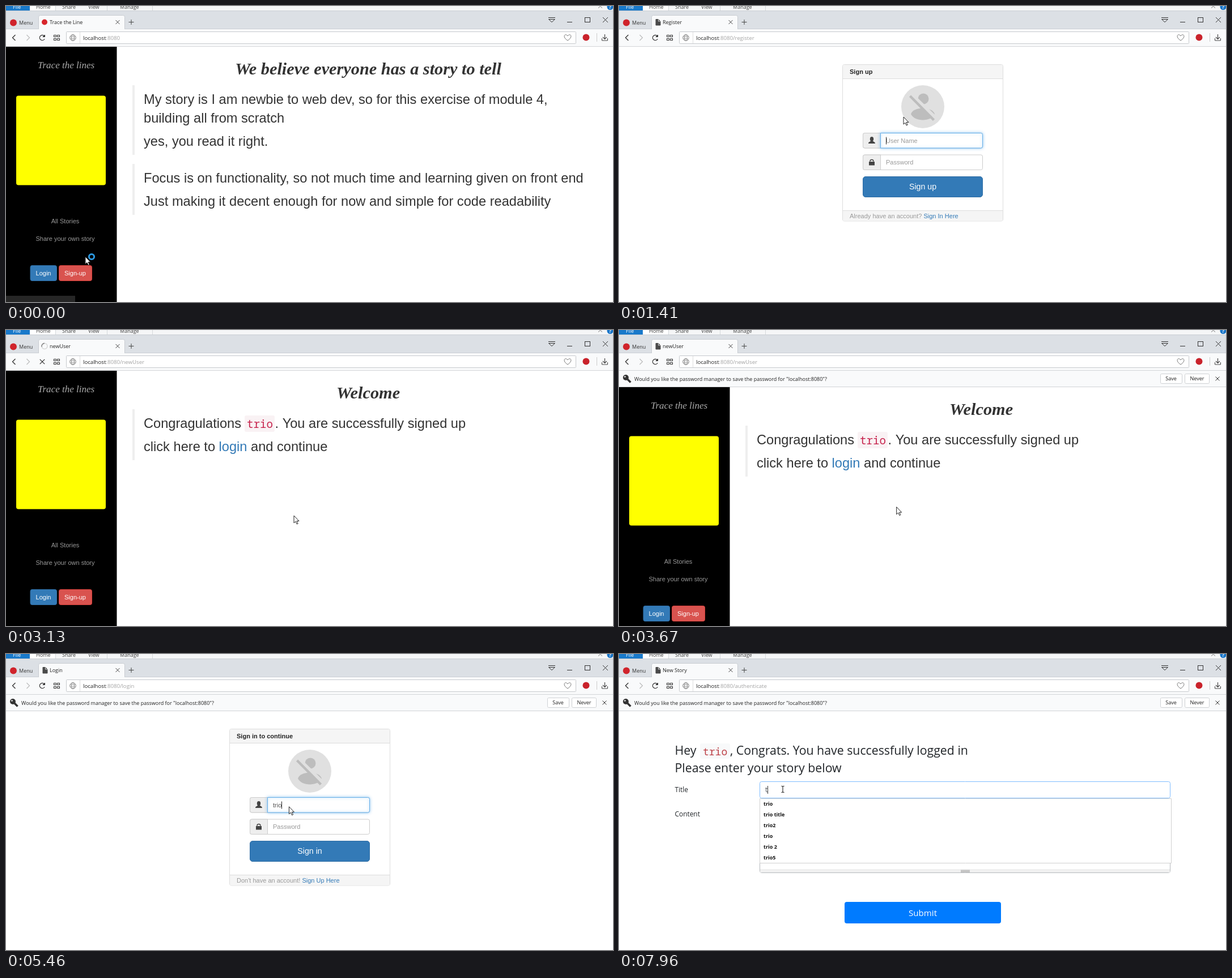
Write an HTML page with a canvas that moves like this. It is 1071 px wide and 523 px high and loops after 8000 ms.

```html
<!DOCTYPE html>
<html lang="en">
<head>
<meta charset="utf-8">
<title>Sign up, sign in, write a story</title>
<style>
html, body { margin: 0; width: 100%; height: 100%; overflow: hidden; background: #fff; }
canvas { display: block; width: 1071px; height: 523px; }
</style>
</head>
<body>
<canvas id="stage"></canvas>
<script>
const W = 1071, H = 523, LOOP = 8000, BAR = 29;
const canvas = document.getElementById('stage');
const c = canvas.getContext('2d');
const dpr = window.devicePixelRatio || 1;
canvas.width = W * dpr;
canvas.height = H * dpr;

const USER = 'trio';
const UI = '"Open Sans", "Noto Sans", sans-serif';
const SANS = '"Liberation Sans", Arial, sans-serif';
const MONO = '"Noto Sans Mono", "DejaVu Sans Mono", monospace';
const SCRIPT = '"Liberation Serif", serif';
const SMALL = '11.03px ' + SANS;
const BODY = '23.64px ' + SANS;

// Screen updates come in bursts: start, end, number of steps
const BURSTS = [
  [80, 870, 11], [950, 1410, 7], [1570, 1880, 5], [2030, 2500, 7],
  [2760, 3370, 9], [3590, 3980, 6], [4210, 4530, 5], [4760, 5540, 11],
  [5710, 6250, 8], [6420, 6890, 7], [7350, 7810, 7], [7960, 7960, 1]
];

// Pointer path: time, x, y, shape
const PATH = [
  [0, 140, 443, 'busy'], [80, 140, 446, 'arrow'], [235, 125, 470, 'hand'],
  [390, 125, 470, 'hand'], [633, 487, 310, 'hand'], [945, 487, 310, 'hand'],
  [1100, 497, 238, 'beam'], [1255, 497, 238, 'beam'], [1410, 502, 196, 'arrow'],
  [1725, 502, 196, 'arrow'], [1880, 497, 285, 'beam'], [2420, 497, 285, 'beam'],
  [2500, 508, 328, 'arrow'], [3590, 508, 328, 'arrow'], [3900, 392, 231, 'hand'],
  [4210, 392, 231, 'hand'], [4290, 399, 245, 'arrow'], [4530, 487, 339, 'hand'],
  [4760, 487, 339, 'hand'], [4990, 497, 266, 'beam'], [5070, 497, 266, 'beam'],
  [5225, 502, 222, 'arrow'], [5380, 502, 222, 'arrow'], [5540, 497, 314, 'beam'],
  [6020, 497, 314, 'beam'], [6170, 512, 349, 'arrow'], [6730, 512, 349, 'arrow'],
  [6800, 512, 349, 'beam'], [7350, 512, 349, 'beam'], [7650, 289, 239, 'beam']
];

function snap(t) {
  let at = 0;
  for (const [from, to, steps] of BURSTS) {
    if (t < from) break;
    const gap = (to - from) / Math.max(1, steps - 1);
    const n = gap ? Math.min(steps - 1, Math.floor((t - from + 10) / gap)) : 0;
    at = from + n * gap;
  }
  return at;
}

function pointerAt(t) {
  let i = 0;
  while (i < PATH.length - 1 && PATH[i + 1][0] <= t) i++;
  const a = PATH[i], b = PATH[i + 1] || a;
  let k = b === a ? 0 : (t - a[0]) / (b[0] - a[0]);
  k = k * k * (3 - 2 * k);
  return { x: a[1] + (b[1] - a[1]) * k, y: a[2] + (b[2] - a[2]) * k, shape: k > 0.6 ? b[3] : a[3] };
}

const typed = (t, from, gap) => Math.max(0, Math.min(4, 1 + Math.floor((t - from + 6) / gap)));

function text(str, x, y, font, color, align = 'left') {
  c.font = font;
  c.fillStyle = color;
  c.textAlign = align;
  c.fillText(str, x, y);
}

function rect(x, y, w, h, color) {
  c.fillStyle = color;
  c.fillRect(x, y, w, h);
}

function box(x, y, w, h, r, fill, stroke) {
  c.beginPath();
  c.roundRect(x, y, w, h, r);
  if (fill) { c.fillStyle = fill; c.fill(); }
  if (stroke) { c.strokeStyle = stroke; c.lineWidth = 1; c.stroke(); }
}

function line(points, color, width = 1, fill) {
  c.beginPath();
  for (let i = 0; i < points.length; i += 2) c.lineTo(points[i], points[i + 1]);
  if (fill) { c.closePath(); c.fillStyle = fill; c.fill(); }
  c.strokeStyle = color;
  c.lineWidth = width;
  c.stroke();
}

function dot(x, y, r, color) {
  c.beginPath();
  c.arc(x, y, r, 0, 7);
  c.fillStyle = color;
  c.fill();
}

function arc(x, y, r, a, b, color, width = 1) {
  c.beginPath();
  c.arc(x, y, r, a, b);
  c.strokeStyle = color;
  c.lineWidth = width;
  c.stroke();
}

function cross(x, y, r, color, width = 1) {
  line([x - r, y - r, x + r, y + r], color, width);
  line([x - r, y + r, x + r, y - r], color, width);
}

function ribbon() {
  rect(0, 0, W, 9, '#f5f6f7');
  rect(0, 0, 42, 8, '#1979ca');
  rect(42, 0, 46, 8, '#fff');
  text('File', 12, 5, '9px ' + UI, '#fff');
  [['Home', 53], ['Share', 99], ['View', 145], ['Manage', 201]].forEach(([s, x]) => text(s, x, 5, '9px ' + UI, '#444'));
  for (const x of [87, 178, 258]) rect(x, 0, 1, 8, '#d5d8db');
  line([1045, 3.5, 1048.5, 0.5, 1052, 3.5], '#777');
  dot(1066, 1.5, 5.5, '#1976c9');
  text('?', 1066, 5, 'bold 8px ' + UI, '#fff', 'center');
  rect(0, 8, W, 1, '#c9cdd2');
}

function favicon(page, loading, t) {
  if (loading) {
    arc(68, 28.5, 5, 0, 7, '#d8d8d8', 1.6);
    const a = 2.6 + t / 160;
    arc(68, 28.5, 5, a, a + 1.8, '#8c8c8c', 1.6);
  } else if (page === 'home') {
    dot(68, 28.5, 5, '#d8262c');
  } else {
    line([65, 23.5, 69.5, 23.5, 73, 27, 73, 34, 65, 34], '#4a4a4a', 1, '#4a4a4a');
    line([69.5, 23.5, 69.5, 27, 73, 27], '#f9fafb', 0.8);
  }
}

const TABS = {
  home: ['Trace the Line', ''], register: ['Register', '/register'], newUser: ['newUser', '/newUser'],
  login: ['Login', '/login'], story: ['New Story', '/authenticate']
};

function browser(page, loading, t) {
  ribbon();
  rect(0, 9, W, 32, '#dce0e5');
  rect(0, 40, W, 1, '#ccd0d5');
  box(57.5, 16.5, 152, 26, [3, 3, 0, 0], '#f9fafb', '#c8ccd1');
  rect(0, 41, W, 31, '#f9fafb');
  rect(0, 71, W, 1, '#d3d5d8');
  dot(13, 29.5, 6, '#d0232b');
  text('Menu', 23, 33, '9px ' + UI, '#333');
  favicon(page, loading, t);
  text(TABS[page][0], 77, 32, '9px ' + UI, '#222');
  cross(197, 28.5, 3.5, '#444');
  line([216.5, 28.5, 225.5, 28.5], '#444');
  line([221, 24, 221, 33], '#444');

  line([957, 20.5, 969, 20.5], '#333');
  line([957.5, 23.5, 963, 28.5, 968.5, 23.5, 957.5, 23.5], '#333');
  line([990, 28.5, 999, 28.5], '#333');
  c.strokeRect(1021.5, 20.5, 9, 8);
  cross(1057.5, 24.5, 4.5, '#333');

  line([16.5, 51, 11.5, 56, 16.5, 61], '#333', 1.3);
  line([36.5, 51, 41.5, 56, 36.5, 61], '#bbb', 1.2);
  if (loading) cross(64, 56, 4.2, '#333', 1.2);
  else {
    arc(64, 56, 4.6, 0.5, 5.6, '#333', 1.3);
    line([68.5, 51, 68.5, 54.5, 65, 54.5], '#333', 1, '#333');
  }
  c.strokeStyle = '#333';
  c.lineWidth = 1;
  for (const x of [84.5, 90.5]) for (const y of [51.5, 57.5]) c.strokeRect(x, y, 4, 3);

  box(106.5, 45.5, 899, 21, 1, '#fff', '#c6c9cd');
  rect(130, 46, 1, 20, '#dcdcdc');
  arc(118, 56, 5.3, 0, 7, '#888');
  c.beginPath();
  c.ellipse(118, 56, 2.4, 5.3, 0, 0, 7);
  c.stroke();
  line([113, 54.2, 123, 54.2], '#888', 0.8);
  line([113, 57.8, 123, 57.8], '#888', 0.8);
  const font = '9.64px ' + UI;
  text('localhost', 136, 60, font, '#222');
  const x = 136 + c.measureText('localhost').width;
  text(':8080' + TABS[page][1], x, 60, font, '#a3a3a3');
  c.beginPath();
  c.moveTo(991, 61);
  c.bezierCurveTo(980, 54, 987, 47, 991, 53);
  c.bezierCurveTo(995, 47, 1002, 54, 991, 61);
  c.strokeStyle = '#777';
  c.lineWidth = 1;
  c.stroke();
  dot(1023.5, 55.5, 6, '#c9222b');
  rect(1042, 48, 1, 15, '#ccc');
  line([1056.5, 50, 1056.5, 58], '#444', 1.2);
  line([1053, 55, 1056.5, 58.5, 1060, 55], '#444', 1.2);
  line([1051.5, 57, 1051.5, 61, 1061.5, 61, 1061.5, 57], '#444');
}

function passwordBar() {
  rect(0, 72, W, 28, '#f9fafb');
  rect(0, 100, W, 1, '#d0d2d5');
  dot(12, 84, 5, '#333');
  line([14, 86, 20.5, 92.5], '#333', 3.6);
  dot(10.5, 82.5, 1.3, '#f9fafb');
  text('Would you like the password manager to save the password for "localhost:8080"?', 27, 90, '9px ' + UI, '#222');
  box(955.5, 77.5, 38, 17, 2, '#fff', '#cfd1d4');
  box(998.5, 77.5, 43, 17, 2, '#fff', '#cfd1d4');
  text('Save', 974, 89, '9.1px ' + UI, '#222', 'center');
  text('Never', 1020, 89, '9.1px ' + UI, '#222', 'center');
  cross(1056, 86, 3.5, '#333');
}

function sidebar() {
  rect(0, 72, 195.5, H, '#000');
  text('Trace the lines', 106, 110, 'italic 17px ' + SCRIPT, '#aaa', 'center');
  box(18, 158.5, 158, 158, 4, '#ff0');
  text('All Stories', 104.5, 383.5, SMALL, '#999', 'center');
  text('Share your own story', 104.5, 415, SMALL, '#999', 'center');
  box(43, 458.5, 46.5, 27, 3, '#337ab7', '#2e6da4');
  box(93.5, 458.5, 58, 27, 3, '#d9534f', '#d43f3a');
  text('Login', 66, 475.7, SMALL, '#fff', 'center');
  text('Sign-up', 122, 475.7, SMALL, '#fff', 'center');
}

function title(str) {
  text(str, 639, 121, 'italic bold 30.3px ' + SCRIPT, '#333', 'center');
}

function quote(y, h, rows) {
  rect(223, y, 4, h, '#eee');
  for (const [str, base] of rows) text(str, 243, base, BODY, '#333');
}

function home() {
  sidebar();
  title('We believe everyone has a story to tell');
  quote(140, 123, [
    ['My story is I am newbie to web dev, so for this exercise of module 4,', 173],
    ['building all from scratch', 206], ['yes, you read it right.', 247]]);
  quote(279, 90, [
    ['Focus is on functionality, so not much time and learning given on front end', 312],
    ['Just making it decent enough for now and simple for code readability', 353]]);
}

function welcome() {
  sidebar();
  title('Welcome');
  quote(140, 90, [['Congragulations', 173], ['click here to', 214]]);
  box(421, 151, 53, 29, 3, '#f9f2f4');
  text(USER, 425, 173, '19.2px ' + MONO, '#c7254e');
  text('. You are successfully signed up', 474.5, 173, BODY, '#333');
  text('login', 375.5, 214, BODY, '#337ab7');
  text('and continue', 432, 214, BODY, '#333');
}

function avatar() {
  dot(536, 178, 38, '#e0e0e0');
  dot(537, 164, 9.5, '#bdbdbd');
  c.beginPath();
  c.moveTo(515, 191);
  c.bezierCurveTo(519, 177, 553, 177, 557, 191);
  c.bezierCurveTo(550, 205, 522, 205, 515, 191);
  c.fill();
  line([516, 156, 561, 200], '#e0e0e0', 6);
  line([513.5, 159, 555.5, 201.5], '#bdbdbd', 4.5);
}

function userIcon() {
  c.beginPath();
  c.ellipse(446, 235, 3.2, 4, 0, 0, 7);
  c.fillStyle = '#444';
  c.fill();
  c.beginPath();
  c.moveTo(440, 243);
  c.bezierCurveTo(440, 239.5, 444, 240, 444.5, 237.5);
  c.lineTo(447.5, 237.5);
  c.bezierCurveTo(448, 240, 452, 239.5, 452, 243);
  c.fill();
}

function lockIcon() {
  rect(441, 275, 10, 6.5, '#444');
  arc(446, 274.5, 3, Math.PI, 0, '#444', 1.7);
}

function field(y, hint, value, focus, caret, icons) {
  const split = icons ? 461.5 : 459.5;
  box(430.5, y, 211, 26.5, 3, '#fff', '#ccc');
  box(430.5, y, split - 430.5, 26.5, [3, 0, 0, 3], '#eee', '#ccc');
  if (focus) {
    c.save();
    c.shadowColor = 'rgba(102,175,233,.7)';
    c.shadowBlur = 5 * dpr;
    box(split, y, 641.5 - split, 26.5, [0, 3, 3, 0], '#fff', '#66afe9');
    c.restore();
  }
  const x = split + 9.5, base = y + 17.2;
  let end = x;
  if (hint === 'Password' && value) {
    for (let i = 0; i < value.length; i++) dot(x + 2 + i * 4, y + 13.3, 1.4, '#444');
    end += value.length * 4 + 0.5;
  } else {
    text(value || hint, x, base, SMALL, value ? '#555' : '#999');
    if (value) end += c.measureText(value).width;
  }
  if (caret) rect(Math.round(end), y + 7, 1, 13, '#222');
}

function form(o) {
  box(394.5, 103.5, 283, 276.5, 3, '#fff', '#ddd');
  box(395, 104, 282, 24, [3, 3, 0, 0], '#f5f5f5');
  rect(395, 128, 282, 1, '#ddd');
  rect(395, 361, 282, 18.5, '#f5f5f5');
  rect(395, 361, 282, 1, '#ddd');
  text(o.head, 407, 120, 'bold ' + SMALL, '#222');
  avatar();
  field(224.5, 'User Name', o.user, o.focus === 1, o.focus === 1 || o.caret, o.icons);
  field(263, 'Password', o.pass, o.focus === 2, o.focus === 2, o.icons);
  if (o.icons) { userIcon(); lockIcon(); }
  if (o.pressed) box(429.5, 300.5, 213, 38, 5, '#7fb0f5');
  box(430.5, 301.5, 211, 36, 4.5, o.pressed ? '#286090' : '#337ab7', o.pressed ? '#3f7cc4' : '#2e6da4');
  text(o.button, 536, 324.3, '14.2px ' + SANS, '#fff', 'center');
  text(o.ask, 407, 374.7, SMALL, '#999');
  const x = 407 + c.measureText(o.ask + ' ').width;
  text(o.link, x, 374.7, SMALL, '#337ab7');
}

function register(t) {
  form({
    head: 'Sign up', button: 'Sign up', ask: 'Already have an account?', link: 'Sign In Here',
    icons: t > 700, pressed: t > 2490,
    focus: t > 2490 ? 0 : t > 1870 ? 2 : t > 1240 ? 1 : 0,
    user: USER.slice(0, typed(t, 1570, 77.5)), pass: '*'.repeat(typed(t, 2265, 78))
  });
}

function login(t) {
  form({
    head: 'Sign in to continue', button: 'Sign in', ask: "Don't have an account!", link: 'Sign Up Here',
    icons: true, caret: t < 5060, pressed: t > 6240,
    focus: t > 6240 ? 0 : t > 5530 ? 2 : t > 5060 ? 1 : 0,
    user: USER.slice(0, typed(t, 5150, 78)), pass: '*'.repeat(typed(t, 5785, 77))
  });
}

function story(t) {
  const head = '500 21.3px ' + UI, label = '11.9px ' + UI, dark = '#212529';
  text('Hey', 98.5, 178, head, dark);
  box(143, 158, 53, 27, 3, '#f8f9fa');
  text(USER, 148, 178.5, '18px ' + MONO, '#bd4147');
  text(', Congrats. You have successfully logged in', 196, 178, head, dark);
  text('Please enter your story below', 98.5, 209, head, dark);
  text('Title', 98.5, 243.5, label, dark);
  text('Content', 98.5, 286.5, label, dark);
  box(248.5, 268.5, 724, 118, 3, '#fff', '#b5b9bd');
  rect(249, 380, 723, 6, '#f0f0f0');
  rect(603, 381.5, 16, 4.5, '#c4c4c4');
  const focus = t > 7640;
  box(248.5, 225.5, 724, 29, 3, '#fff', focus ? '#80bdff' : '#ced4da');
  box(398, 438, 276, 38, 4, '#007bff');
  text('Submit', 536, 462.7, '15.1px ' + UI, '#fff', 'center');
  if (t >= 7960) {
    text(USER[0], 258, 244, label, '#495057');
    box(248.5, 255.5, 726, 114, 0, '#fff', '#d0d0d0');
    ['', ' title', '2', '', ' 2', '5'].forEach((s, i) => text(USER + s, 255, 268.3 + i * 18.9, 'bold 9px ' + UI, '#111'));
  }
  if (focus) rect(t >= 7960 ? 262 : 258, 233, 1, 14, '#333');
}

function status(str, w, alpha) {
  if (alpha <= 0) return;
  c.globalAlpha = Math.min(1, alpha);
  box(-1.5, 511.5, w, 14, 2, '#f5f5f5', '#ccc');
  text(str, 4, 525, '9.2px ' + UI, '#555');
  c.globalAlpha = 1;
}

function statusBar(t) {
  if (t < 150) {
    rect(0, 512, 122, 11, '#262626');
  } else if (t > 230 && t < 800) {
    status('localhost:8080/register', 116, t < 390 ? 1 : 0.9 - (t - 390) / 300);
  } else if (t > 3820 && t < 4500) {
    status('localhost:8080/login', 105, t < 4220 ? 1 : 0.65 - (t - 4220) / 300);
  }
}

function pointer(t) {
  const { x, y, shape } = pointerAt(t);
  c.save();
  c.translate(x, y);
  c.lineJoin = 'round';
  if (shape === 'beam') {
    for (const [color, w] of [['#fff', 2.4], ['#222', 1.1]]) {
      line([0, -5, 0, 5], color, w);
      line([-2.5, -5.8, 0, -5, 2.5, -5.8], color, w);
      line([-2.5, 5.8, 0, 5, 2.5, 5.8], color, w);
    }
  } else if (shape === 'hand') {
    c.beginPath();
    c.moveTo(-1.6, 9);
    c.lineTo(-1.6, 0.5);
    c.quadraticCurveTo(0, -2, 1.6, 0.5);
    c.lineTo(1.6, 5);
    c.lineTo(6.5, 6.5);
    c.quadraticCurveTo(8, 7, 7.5, 11);
    c.lineTo(6, 16.5);
    c.lineTo(-0.5, 16.5);
    c.lineTo(-5, 10.5);
    c.quadraticCurveTo(-4.5, 8, -1.6, 10.5);
    c.closePath();
    c.fillStyle = '#fff';
    c.fill();
    c.strokeStyle = '#222';
    c.lineWidth = 1;
    c.stroke();
    line([3.3, 6, 3.3, 9], '#222', 0.8);
    line([5.5, 6.6, 5.5, 9.2], '#222', 0.8);
  } else {
    line([0, 0, 0, 13, 3, 10.3, 5.2, 15, 7.2, 14, 5, 9.5, 9, 9.5, 0, 0], '#222', 1, '#fff');
    if (shape === 'busy') arc(11, 0, 4.6, 0, 7, '#2b98e0', 3);
  }
  c.restore();
}

const PAGES = [
  [6560, 'story', story], [4280, 'login', login], [2830, 'newUser', welcome],
  [390, 'register', register], [0, 'home', home]
];
const LOADS = [[310, 780], [2750, 3280], [4200, 4440], [6560, 6800]];

function draw(now) {
  const t = snap(now % LOOP);
  const [, name, page] = PAGES.find(p => t >= p[0]);
  const loading = LOADS.some(([a, b]) => t >= a && t < b);
  const bar = t > 3200;
  c.setTransform(dpr, 0, 0, dpr, 0, 0);
  rect(0, 0, W, H, '#fff');
  c.save();
  // The story layout is placed in stage coordinates already
  if (bar && name !== 'story') c.translate(0, BAR);
  page(t);
  c.restore();
  browser(name, loading, t);
  if (bar) passwordBar();
  statusBar(t);
  pointer(t);
}

const start = performance.now();
function tick() {
  draw(performance.now() - start);
  requestAnimationFrame(tick);
}
tick();
</script>
</body>
</html>
```
